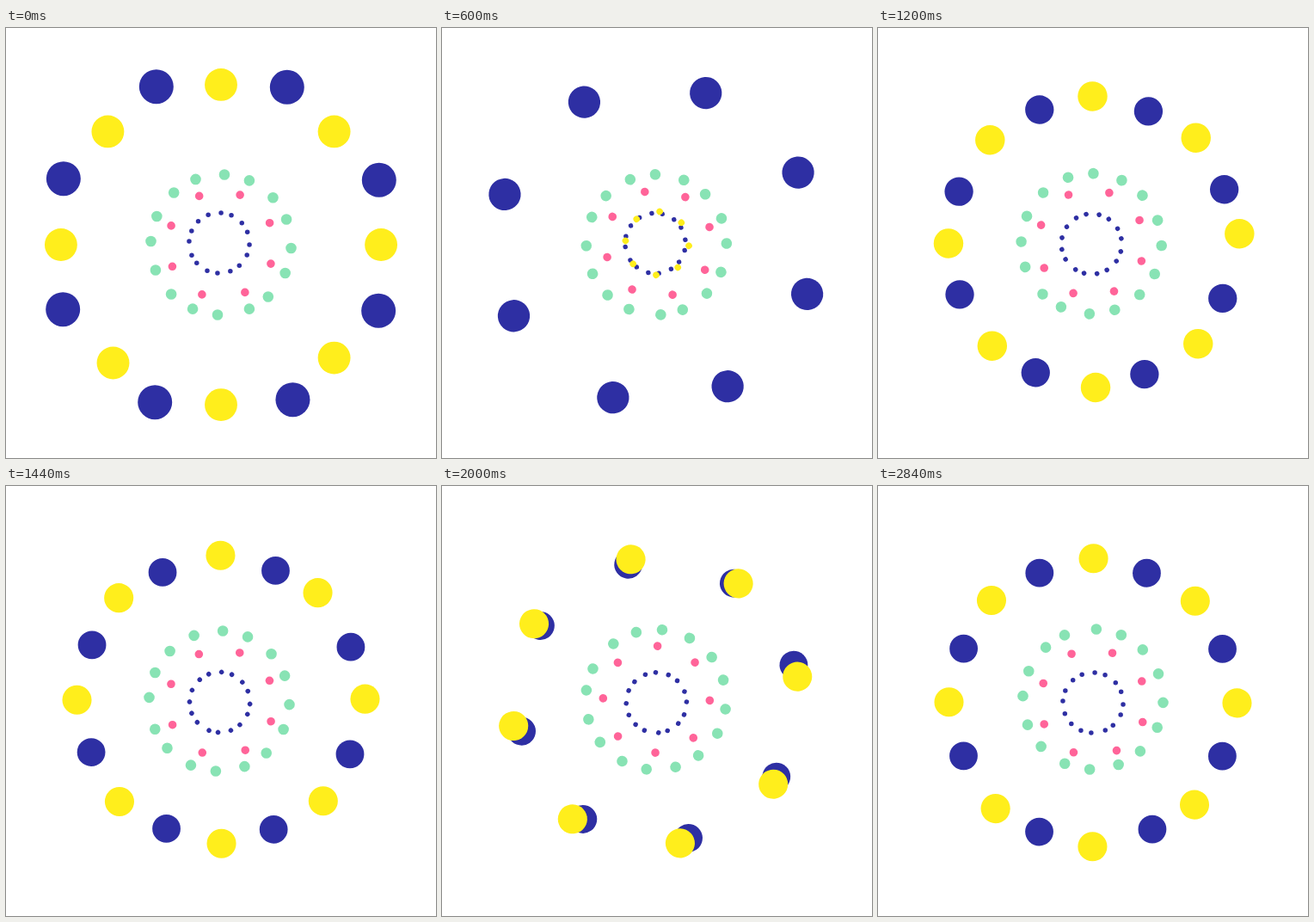
Animation, 500 px wide and 500 px high, one loop 2880 ms. Source, as an HTML page:

```html
<!DOCTYPE html>
<html lang="en">
<head>
<meta charset="utf-8">
<title>Dot rings</title>
<style>
  html, body { margin: 0; width: 100%; height: 100%; overflow: hidden; background: #fff; }
  svg { display: block; width: 100%; height: 100%; }

  .ring {
    transform-origin: 0 0;
    animation: 2880ms cubic-bezier(.3333, 0, .6667, 1) infinite;
    animation-name: turn, none;
  }
  .outer-blue { animation-name: turn, settle; }
  .outer-yellow { animation-name: turn, bounce; }

  @keyframes turn { from { rotate: 0deg; } to { rotate: var(--turn); } }
  @keyframes settle { 0% { scale: 1; } 50%, 100% { scale: .82; } }
  /* stops at 520, 880 and 1240 ms */
  @keyframes bounce {
    0% { scale: 1; }
    18.0556% { scale: .05; }
    30.5556% { scale: 1.2; }
    43.0556%, 100% { scale: .9; }
  }
</style>
</head>
<body>
<svg viewBox="0 0 500 500"><g id="rings" transform="translate(250 250)"></g></svg>
<script>
  const BLUE = '#2e2fa3', YELLOW = '#ffee1c', GREEN = '#88e3b4', PINK = '#ff6499';
  const UNEVEN = 2.6; // the first dot of each ring sits a little early

  // phases: angle of the first dot of each set of eight, in degrees
  const rings = [
    { name: 'inner', color: BLUE, radius: 35.1, dot: 2.75, turn: -90, x: -2, y: 0, phases: [228.4, 158.55] },
    { name: 'pink', color: PINK, radius: 62, dot: 4.8, turn: -720, x: 0, y: 2, phases: [65.9] },
    { name: 'green', color: GREEN, radius: 81.6, dot: 6.3, turn: 180, x: 0, y: 2, phases: [137.8, 68.8] },
    { name: 'outer-blue', color: BLUE, radius: 198.6, dot: 20, turn: 360, x: 0, y: 2, phases: [67.75] },
    { name: 'outer-yellow', color: YELLOW, radius: 186.1, dot: 18.95, turn: -360, x: 0, y: 2, phases: [135] }
  ];

  function add(parent, tag, attributes) {
    const node = document.createElementNS('http://www.w3.org/2000/svg', tag);
    for (const key in attributes) node.setAttribute(key, attributes[key]);
    return parent.appendChild(node);
  }

  const stage = document.getElementById('rings');
  for (const ring of rings) {
    const group = add(stage, 'g', {
      class: `ring ${ring.name}`, fill: ring.color, style: `--turn: ${ring.turn}deg`
    });
    for (const phase of ring.phases) {
      for (let i = 0; i < 8; i++) {
        const angle = (phase + i * 45 - (i ? 0 : UNEVEN)) * Math.PI / 180;
        add(group, 'circle', {
          cx: ring.x + ring.radius * Math.cos(angle),
          cy: ring.y + ring.radius * Math.sin(angle),
          r: ring.dot
        });
      }
    }
  }
</script>
</body>
</html>
```
